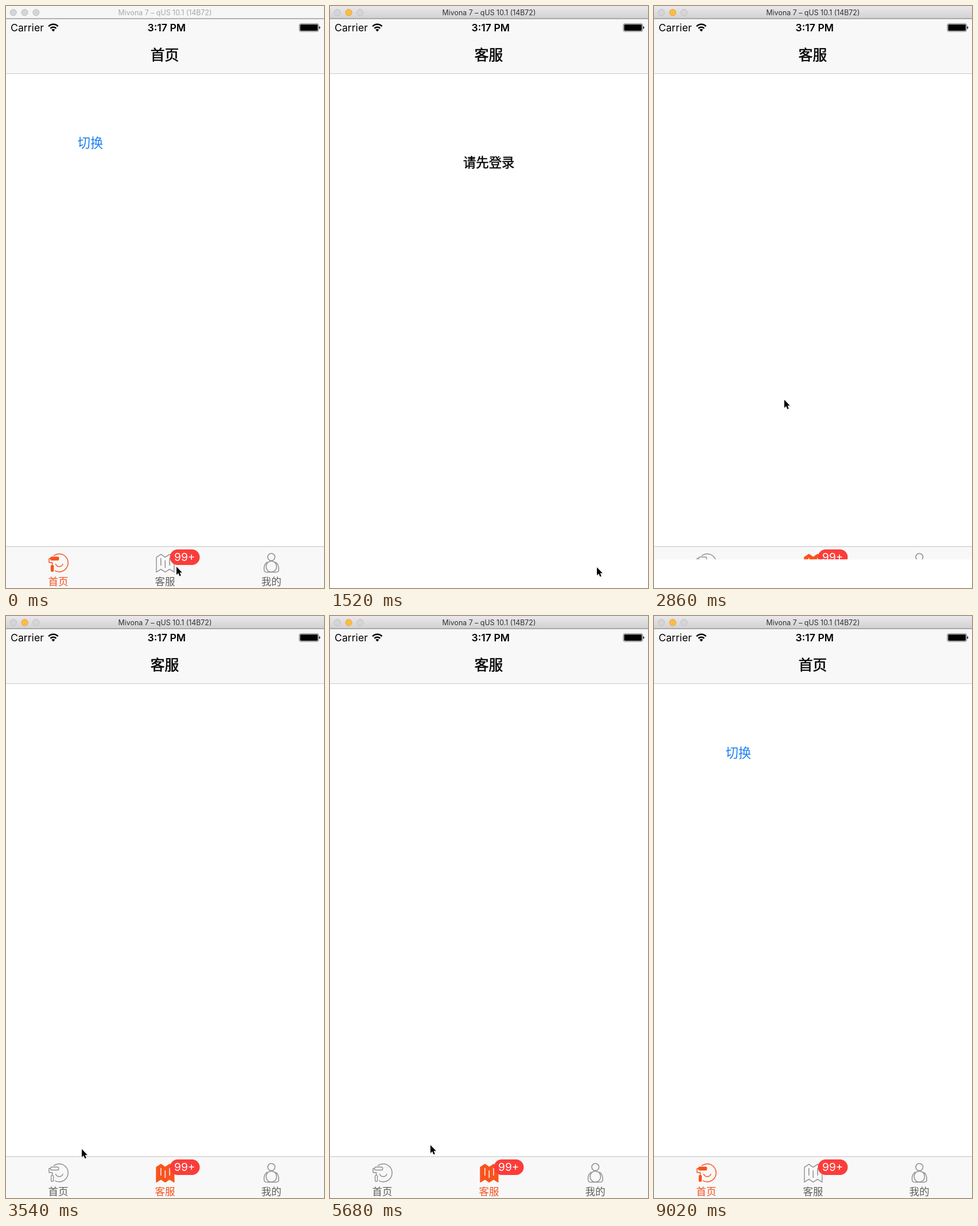
Recreate the animation shown at these times as an HTML page. Size 554 px wide and 1011 px high, loop 9.06 s.

```html
<!DOCTYPE html>
<html lang="zh-CN">
<head>
<meta charset="utf-8">
<title>Tab bar demo</title>
<style>
  html, body { margin: 0; width: 100%; height: 100%; overflow: hidden; background: #fff; }
  svg { display: block; width: 554px; height: 1011px; }
  text { font-family: Inter, Roboto, "Noto Sans CJK SC", "Noto Sans CJK", sans-serif; text-anchor: middle; }
  .cjk { font-family: "Noto Sans CJK SC", "Noto Sans CJK", "Noto Sans", sans-serif; }
  .tab { --ink: #8f8f8f; --label: #5e5e5e; --fill: none; }
  .tab.on { --ink: #f9531e; --label: #f4511e; --fill: #f9531e; }
  .tab text { fill: var(--label); font-size: 17.5px; }
  .line { fill: none; stroke: var(--ink); stroke-width: 1.5; stroke-linecap: round; stroke-linejoin: round; }
  .solid { fill: var(--fill); stroke: var(--ink); stroke-width: 1.4; stroke-linejoin: round; }
  .fold { fill: none; stroke: var(--ink); stroke-width: 1.5; stroke-linecap: round; }
  .tab.on .fold { stroke: #f8f8f8; }
</style>
</head>
<body>
<svg viewBox="0 0 554 1011">
  <defs>
    <linearGradient id="chrome" x2="0" y2="1">
      <stop offset="0" stop-color="#ebe8ec"/>
      <stop offset="1" stop-color="#d2d0d3"/>
    </linearGradient>
  </defs>
  <rect width="554" height="1011" fill="#fff"/>

  <!-- page -->
  <rect y="22" width="554" height="95" fill="#f8f8f8"/>
  <rect y="117" width="554" height="1" fill="#cbcbcd"/>
  <text id="heading" class="cjk" x="276.5" y="94" font-size="24.8" stroke="#000" stroke-width=".55"></text>
  <text id="button" class="cjk" x="147" y="245.8" font-size="22.2" fill="#1b80f0">切换</text>

  <!-- tab bar -->
  <rect y="939" width="554" height="72" fill="#f8f8f8"/>
  <rect y="938.5" width="554" height="1" fill="#bdbdbf"/>
  <g id="homeTab" class="tab">
    <path class="line" d="M83.5 954.6A15.6 15.6 0 1 1 85.5 981.2M86.6 969.5A6.6 6.6 0 0 0 99 969.5M77.5 959.8H75V966.8H80.6V970.5"/>
    <rect class="solid" x="77.7" y="957.3" width="14" height="5.2" rx="1.8"/>
    <rect class="solid" x="78.6" y="971.6" width="4" height="10.6" rx="1.4"/>
    <text class="cjk" x="91" y="1006.4">首页</text>
  </g>
  <g id="helpTab" class="tab">
    <path class="solid" d="M262 957.6L270 952.4L277.3 957.6L285 952.4L292.8 957.6V983.4L285 978.4L277.3 983.4L270 978.4L262 983.4Z"/>
    <path class="fold" d="M269.8 959.5V971.5M277.3 963.5V975.5M285 959.5V971.5"/>
    <text class="cjk" x="277" y="1006.4">客服</text>
  </g>
  <g class="tab">
    <circle class="line" cx="462.3" cy="957.3" r="6.3"/>
    <ellipse class="line" cx="462.3" cy="973.8" rx="9.2" ry="9.6"/>
    <path class="line" d="M455 966.2C450.5 969 449.2 974 449.6 979.5Q450 983.6 454.5 983.6H470Q474.8 983.6 475.1 979.5C475.4 974 474 969 469.6 966.2"/>
    <text class="cjk" x="462.3" y="1006.4">我的</text>
  </g>
  <rect x="285.5" y="944" width="52" height="27" rx="13.5" fill="#fb3d3a"/>
  <text x="311.3" y="964.4" font-size="19.2" fill="#fff">99+</text>

  <!-- login sheet -->
  <g id="sheet">
    <rect y="22" width="554" height="989" fill="#fff"/>
    <text class="cjk" x="276.7" y="164" font-size="22.4" stroke="#000" stroke-width=".4">请先登录</text>
  </g>

  <!-- status bar -->
  <text x="8" y="43.6" font-size="17.7" style="text-anchor:start">Carrier</text>
  <text x="279.8" y="43.6" font-size="17.7" font-weight="600">3:17 PM</text>
  <g fill="none" stroke="#000" stroke-width="2.5">
    <path d="M74.2 35.4A11 11 0 0 1 90.6 35.4M77.4 38.8A7 7 0 0 1 87.4 38.8"/>
    <path d="M79.4 41.2Q82.4 38.9 85.4 41.2L82.4 44.4Z" fill="#000" stroke="none"/>
  </g>
  <rect x="511" y="30.7" width="33.6" height="13.6" rx="2.6" fill="#fff" stroke="#555" stroke-width=".9"/>
  <rect x="512.4" y="32.1" width="30.8" height="10.8" rx="1.4"/>
  <path d="M545.6 35V40Q547.4 39.4 547.4 37.5Q547.4 35.6 545.6 35Z"/>

  <!-- window title -->
  <rect id="bar" width="554" height="22"/>
  <rect y="21.4" width="554" height="1.2" fill="#858585"/>
  <g fill="#d5d4d6" stroke="#bcbbbd" stroke-width=".9">
    <circle cx="12.7" cy="11.3" r="5.6"/>
    <circle id="amber" cx="32.6" cy="11.3" r="5.6"/>
    <circle cx="52.4" cy="11.3" r="5.6"/>
  </g>
  <text id="caption" x="277" y="16" font-size="12.4">Mivona 7 – qUS 10.1 (14B72)</text>

  <g id="cursor">
    <path d="M0 0V14L3.2 11L5.4 16.2L7.8 15.2L5.6 10.2H9.8Z" transform="translate(.6 1.4)" fill="#000" opacity=".2"/>
    <path d="M0 0V14L3.2 11L5.4 16.2L7.8 15.2L5.6 10.2H9.8Z" stroke="#fff" stroke-width="1.6" paint-order="stroke"/>
  </g>
</svg>
<script>
const LOOP = 9060, SHEET = 989;
const el = id => document.getElementById(id);
const ui = Object.fromEntries(
  ['heading', 'button', 'homeTab', 'helpTab', 'sheet', 'bar', 'amber', 'caption', 'cursor'].map(id => [id, el(id)]));

// Pointer stops: time, x, y
const stops = [
  [20, 297, 974], [200, 280, 990], [600, 280, 990], [760, 372, 967], [940, 465, 975],
  [2060, 465, 975], [2260, 227, 684], [3160, 227, 684], [3540, 132, 926], [3680, 92, 984],
  [3900, 92, 984], [4420, 147, 236], [4860, 147, 236], [5680, 175, 919], [5840, 94, 984],
  [6240, 94, 984], [6500, 70, 1030]
];
// Selected tab over time
const picks = [[0, 'home'], [320, 'help'], [3760, 'home'], [4700, 'help'], [6100, 'home']];
const opens = 1170, closes = 2410, activates = 200;

const smooth = p => p * p * (3 - 2 * p);

function pointer(t) {
  const next = stops.findIndex(s => s[0] > t);
  if (next === 0) return stops[0].slice(1);
  if (next < 0) return stops[stops.length - 1].slice(1);
  const [t0, x0, y0] = stops[next - 1], [t1, x1, y1] = stops[next];
  const p = smooth((t - t0) / (t1 - t0));
  return [x0 + (x1 - x0) * p, y0 + (y1 - y0) * p];
}

// Critically damped spring, 0 to 1
function spring(ms) {
  const w = Math.max(0, ms) * 0.0105;
  return 1 - (1 + w) * Math.exp(-w);
}

function sheetOffset(t) {
  if (t < closes) {
    const left = SHEET * (1 - spring(t - opens));
    return left < 0.6 ? 0 : left;
  }
  return SHEET * spring(t - closes);
}

function draw(t) {
  const active = t >= activates;
  const home = picks.filter(p => p[0] <= t).pop()[1] === 'home';
  ui.bar.setAttribute('fill', active ? 'url(#chrome)' : '#f6f6f6');
  ui.caption.setAttribute('fill', active ? '#303030' : '#a8a8a8');
  ui.amber.setAttribute('fill', active ? '#fdbc40' : '#d5d4d6');
  ui.amber.setAttribute('stroke', active ? '#e0a035' : '#bcbbbd');
  ui.heading.textContent = home ? '首页' : '客服';
  ui.button.style.display = home ? '' : 'none';
  ui.homeTab.classList.toggle('on', home);
  ui.helpTab.classList.toggle('on', !home);

  const shown = t >= opens && t < closes + 1000;
  ui.sheet.style.display = shown ? '' : 'none';
  ui.sheet.setAttribute('transform', `translate(0 ${sheetOffset(t).toFixed(2)})`);

  const [x, y] = pointer(t);
  ui.cursor.setAttribute('transform', `translate(${x.toFixed(1)} ${y.toFixed(1)})`);
}

function tick() {
  draw(performance.now() % LOOP);
  requestAnimationFrame(tick);
}
tick();
</script>
</body>
</html>
```
